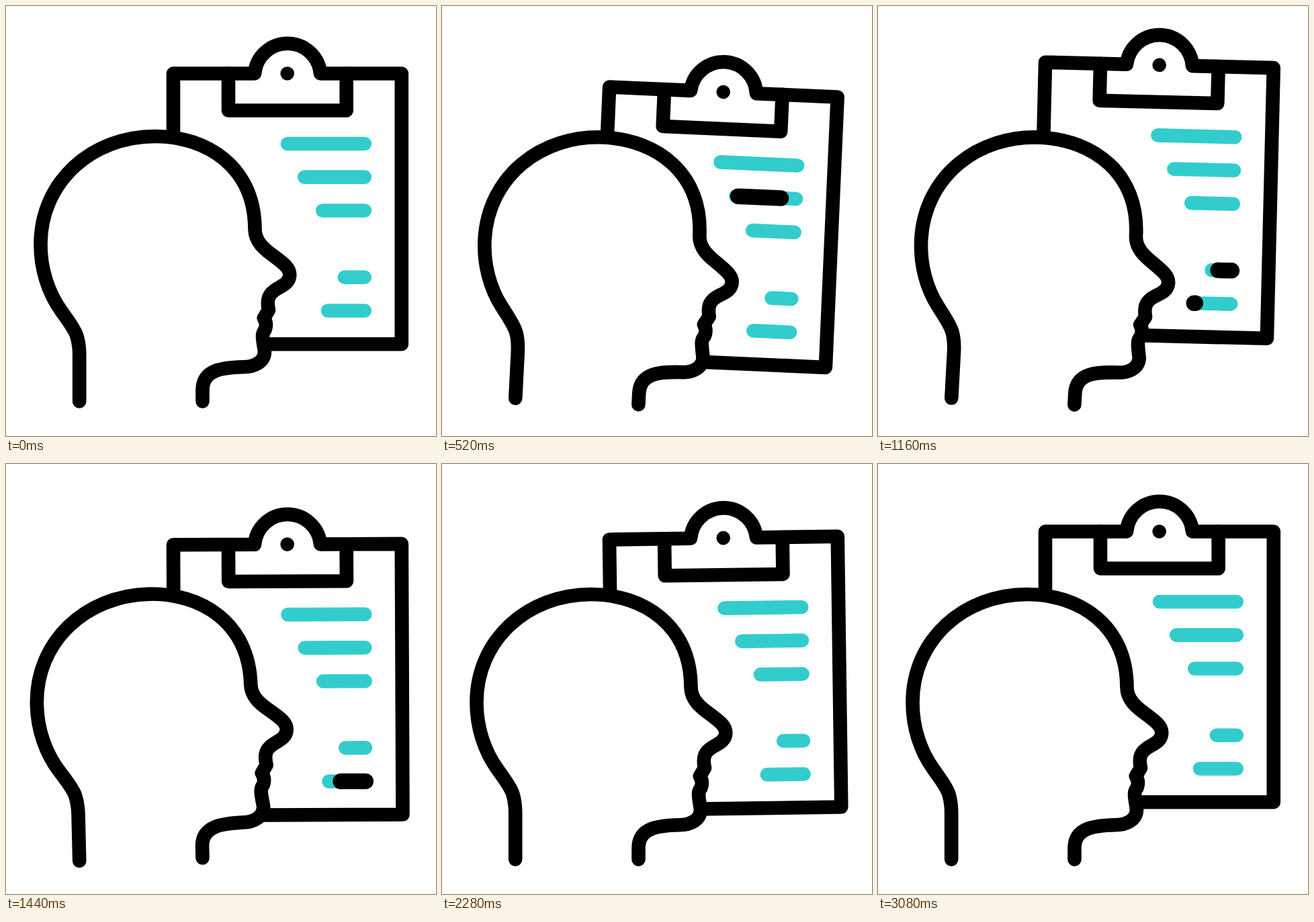
These frames come from a looping animation (640x640 px, 3.12 s). An HTML page:

```html
<!DOCTYPE html>
<html lang="en">
<head>
<meta charset="utf-8">
<title>Profile and clipboard</title>
<style>
  html, body { margin: 0; width: 100%; height: 100%; overflow: hidden; background: #fff; }
  svg { display: block; width: 100vw; height: 100vh; }
  .ink { fill: none; stroke: #000; stroke-width: 20.6; stroke-linecap: round; stroke-linejoin: round; }
  .teal { stroke: #3cc; stroke-width: 20.6; stroke-linecap: round; }
  .sweep { stroke: #000; stroke-width: 23.5; stroke-linecap: round; }
</style>
</head>
<body>
<svg viewBox="0 0 640 640">
  <g id="board">
    <path class="ink" d="M370 100.5H249V503.3H588.8V100.5H468A49.2 49.2 0 0 0 370 100.5Z"/>
    <path class="ink" d="M331 100.5V155.5H506.7V100.5"/>
    <circle cx="418.7" cy="100.5" r="10.3"/>
    <g id="lines"></g>
  </g>
  <path id="head" class="ink" style="fill:#fff" d="M109.2 588.5V520
    C109.2 509 108 499 105 490C101 479 93 469 82 453.5
    C63 427 51.5 392 51.5 355C51.5 261 128 194 222 194
    C300 194 370.5 240 370.5 333C371 351 385 362 395 369.5
    C414 383.5 422.3 390 422.3 400C422.3 411 413 415.5 404 420.5
    C391 428 387.5 436 391 452.5L383.8 464.5Q389 473 385.5 482
    C380 488 382 495 385 514C385 529 371 537.2 353 537.2
    C325 538 292.5 540 292.5 572V588.5"/>
</svg>
<script>
const LOOP = 3120, STEP = 40;
const LINE_END = 533.8, SWEEP = 280, TAIL_DELAY = 200;

// Keys are [time, value] pairs joined by sine easing.
const headTurn = [[0, 0], [400, 5], [800, -5.1], [1170, 3.1], [1530, -2.15], [1895, 1.1], [2260, 0]];
const boardTurn = [[0, 0], [400, 3.8], [820, -2.95], [1230, 1.73], [1630, -1.92], [1920, 1.2], [2220, -.95], [2500, .6], [2800, 0]];
const boardDrop = [[0, 0], [665, 31], [1035, -25], [1390, 20], [1760, 0], [2250, 9.7], [2800, 0]];
const rows = [[419, 205], [444.2, 254.6], [471.2, 304.5], [504, 403.7], [479, 453.5]];

const byId = id => document.getElementById(id);
const clamp = x => Math.min(1, Math.max(0, x));

function valueAt(keys, t) {
  const i = keys.findIndex(([time]) => time > t);
  if (i < 0) return keys[keys.length - 1][1];
  const [t0, a] = keys[i - 1], [t1, b] = keys[i];
  return a + (b - a) * (1 - Math.cos(Math.PI * (t - t0) / (t1 - t0))) / 2;
}

function addLine(cls, x, y) {
  const line = document.createElementNS('http://www.w3.org/2000/svg', 'line');
  const attrs = { class: cls, x1: x, x2: LINE_END, y1: y, y2: y };
  for (const name in attrs) line.setAttribute(name, attrs[name]);
  return byId('lines').appendChild(line);
}

const sweeps = rows.map(([x, y]) => {
  addLine('teal', x, y);
  return addLine('sweep', x, y);
});

function draw(t) {
  byId('head').setAttribute('transform', `rotate(${valueAt(headTurn, t)} 201 588.5)`);
  byId('board').setAttribute('transform',
    `translate(0 ${valueAt(boardDrop, t)}) rotate(${valueAt(boardTurn, t)} 418.7 100.5)`);
  sweeps.forEach((line, i) => {
    const age = t - 30 - SWEEP * i, x = rows[i][0], span = LINE_END - x;
    const tail = clamp((age - TAIL_DELAY) / SWEEP), tip = clamp(age / SWEEP);
    line.setAttribute('x1', x + span * tail);
    line.setAttribute('x2', x + span * tip);
    line.setAttribute('visibility', tip > tail ? 'visible' : 'hidden');
  });
}

let start;
function tick(now) {
  start ??= now;
  draw(Math.floor((now - start) % LOOP / STEP) * STEP);
  requestAnimationFrame(tick);
}
draw(0);
requestAnimationFrame(tick);
</script>
</body>
</html>
```
